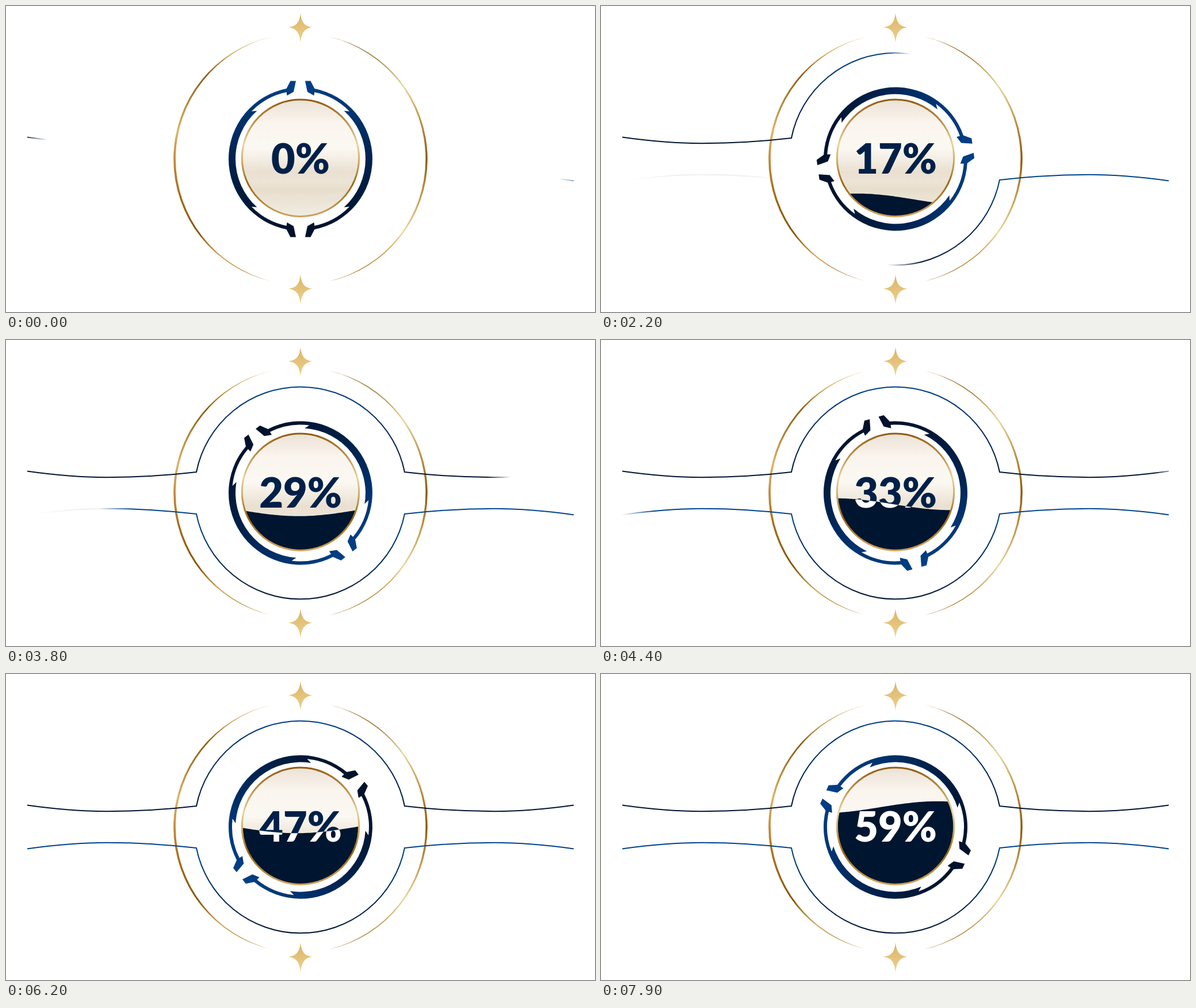
Recreate the animation shown at these times as an HTML page. Size 1024 px wide and 533 px high, loop 8000 ms.

```html
<!DOCTYPE html>
<html lang="en">
<head>
<meta charset="utf-8">
<title>Loading gauge</title>
<style>
  html, body { margin: 0; width: 100%; height: 100%; overflow: hidden; background: #fff; }
  svg { display: block; width: 100%; height: 100%; }
  text { font: 900 72px Lato, "Open Sans", sans-serif; text-anchor: middle; }
</style>
</head>
<body>
<svg viewBox="0 0 1024 533">
  <defs>
    <linearGradient id="star" x2="0" y2="1">
      <stop stop-color="#dcb366"/><stop offset="1" stop-color="#ecd28f"/>
    </linearGradient>
    <linearGradient id="goldLeft" x2="0" y2="1">
      <stop stop-color="#d6b572"/><stop offset=".07" stop-color="#cba557"/>
      <stop offset=".16" stop-color="#8a5a0a"/><stop offset=".38" stop-color="#dcb86a"/>
      <stop offset=".5" stop-color="#c58a3a"/><stop offset=".8" stop-color="#855400"/>
      <stop offset=".9" stop-color="#d3a85c"/><stop offset="1" stop-color="#a27228"/>
    </linearGradient>
    <linearGradient id="goldRight" x2="0" y2="1">
      <stop stop-color="#a27228"/><stop offset=".04" stop-color="#8a5a10"/>
      <stop offset=".2" stop-color="#e8d9a0"/><stop offset=".34" stop-color="#c0954a"/>
      <stop offset=".5" stop-color="#8b5a0a"/><stop offset=".64" stop-color="#c0954a"/>
      <stop offset=".8" stop-color="#ecd9a0"/><stop offset=".92" stop-color="#bb8d40"/>
      <stop offset="1" stop-color="#8b5c10"/>
    </linearGradient>
    <linearGradient id="rim" x2="0" y2="1">
      <stop stop-color="#925c12"/><stop offset=".18" stop-color="#b98d45"/>
      <stop offset=".38" stop-color="#e6d5a0"/><stop offset=".52" stop-color="#d0ad62"/>
      <stop offset=".72" stop-color="#9a6514"/><stop offset="1" stop-color="#cfa25a"/>
    </linearGradient>
    <linearGradient id="cream" x2="0" y2="1">
      <stop stop-color="#ece2d6"/><stop offset=".2" stop-color="#faf5ee"/>
      <stop offset=".42" stop-color="#fbf8f2"/><stop offset=".62" stop-color="#e9e0d0"/>
      <stop offset=".7" stop-color="#ece4d6"/><stop offset=".77" stop-color="#e7decc"/>
      <stop offset="1" stop-color="#f1ece4"/>
    </linearGradient>
    <linearGradient id="navy" gradientUnits="userSpaceOnUse" x1="0" x2="0" y1="130" y2="403">
      <stop stop-color="#004088"/><stop offset=".5" stop-color="#002350"/><stop offset="1" stop-color="#001028"/>
    </linearGradient>
    <linearGradient id="upperInk" x2="0" y2="1">
      <stop stop-color="#003f87"/><stop offset="1" stop-color="#001430"/>
    </linearGradient>
    <linearGradient id="lowerInk" x2="0" y2="1">
      <stop stop-color="#00458f"/><stop offset="1" stop-color="#001430"/>
    </linearGradient>
    <linearGradient id="ghostInk" gradientUnits="userSpaceOnUse" x1="45" x2="331" y1="0" y2="0">
      <stop stop-color="#334" stop-opacity="0"/><stop offset=".3" stop-color="#334" stop-opacity=".08"/>
      <stop offset=".7" stop-color="#334" stop-opacity=".08"/><stop offset="1" stop-color="#334" stop-opacity="0"/>
    </linearGradient>
    <linearGradient id="upperFade" gradientUnits="userSpaceOnUse" y1="0" y2="0">
      <stop stop-color="#fff"/><stop offset="1" stop-color="#fff" stop-opacity="0"/>
    </linearGradient>
    <linearGradient id="lowerFade" gradientUnits="userSpaceOnUse" y1="0" y2="0">
      <stop stop-color="#fff"/><stop offset="1" stop-color="#fff" stop-opacity="0"/>
    </linearGradient>
    <mask id="upperMask" maskUnits="userSpaceOnUse" x="0" y="0" width="1024" height="533">
      <rect width="1024" height="533" fill="url(#upperFade)"/>
    </mask>
    <mask id="lowerMask" maskUnits="userSpaceOnUse" x="0" y="0" width="1024" height="533">
      <rect width="1024" height="533" fill="url(#lowerFade)"/>
    </mask>
    <clipPath id="disc"><circle cx="512" cy="264.8" r="100.7"/></clipPath>
    <clipPath id="waterClip"><path id="waterEdge"/></clipPath>
    <path id="sparkle" fill="url(#star)"
      d="M512 12.5C514 29 519 35.5 533 37C519 39 514 46 512 64C510 46 505 39 491 37C505 35.5 510 29 512 12.5Z"/>
    <g id="half"><path id="band"/><path d="M520 130.5H529.5L537 145L535.5 156L524 149.5Z"/>
      <path d="M520 402.5H529.5L537 388L535.5 377L524 383.5Z"/></g>
  </defs>

  <use href="#sparkle"/>
  <use href="#sparkle" y="455.5"/>
  <path fill="url(#goldLeft)" d="M462 53.5A218.2 218.2 0 0 0 462 479.5A219.3 219.3 0 0 1 462 53.5Z"/>
  <path fill="url(#goldRight)" d="M562 53.5A218.2 218.2 0 0 1 562 479.5A219.2 219.2 0 0 0 562 53.5Z"/>

  <g fill="none" stroke-width="2">
    <path id="ghost" stroke="url(#ghostInk)" d="M37 304.5C83 298 129 293.8 175 293.8C228 293.8 280 297 331 303"/>
    <g mask="url(#upperMask)"><path stroke="url(#upperInk)"
      d="M37 228.5C83 235 129 239.2 175 239.2C228 239.2 280 236 331 230A184.6 184.6 0 0 1 693 230C744 236 796 239.2 849 239.2C895 239.2 941 235 987 228.5"/></g>
    <g mask="url(#lowerMask)"><path stroke="url(#lowerInk)"
      d="M37 304.5C83 298 129 293.8 175 293.8C228 293.8 280 297 331 303A184.6 184.6 0 0 0 693 303C744 297 796 293.8 849 293.8C895 293.8 941 298 987 304.5"/></g>
  </g>

  <g id="ring" fill="url(#navy)">
    <use href="#half"/>
    <use href="#half" transform="matrix(-1 0 0 1 1024 0)"/>
  </g>

  <circle cx="512" cy="264.8" r="101.5" fill="url(#cream)"/>
  <text class="count" x="512" y="291.5" fill="#002048">0%</text>
  <g clip-path="url(#disc)">
    <path id="water" fill="#00152f"/>
    <g clip-path="url(#waterClip)"><text class="count" x="512" y="291.5" fill="#fff">0%</text></g>
  </g>
  <circle cx="512" cy="264.8" r="101.7" fill="none" stroke="url(#rim)" stroke-width="3"/>
</svg>
<script>
const byId = id => document.getElementById(id);
const counts = document.querySelectorAll('.count');
const LOOP = 8000, STEP = 100;

// Water level as [seconds, y]
const levels = [[0, 380], [1.2, 352], [2.2, 337], [3.2, 307], [4.4, 286], [6.2, 267], [7.9, 232]];

// Point on the ring, angle clockwise from the top
function polar(r, degrees) {
  const a = degrees * Math.PI / 180;
  return `${512 + r * Math.sin(a)} ${266.5 - r * Math.cos(a)}`;
}
const arc = (r, degrees, sweep) => `A${r} ${r} 0 0 ${sweep} ${polar(r, degrees)}`;

byId('band').setAttribute('d',
  `M${polar(125, 11)}${arc(125, 169, 1)}L${polar(119, 169)}${arc(119, 134.3, 0)}` +
  `L${polar(113, 138)}${arc(113, 42, 0)}L${polar(119, 45.7)}${arc(119, 11, 0)}Z`);

function levelAt(t) {
  const i = Math.max(1, levels.findIndex(([time]) => time >= t));
  const [t0, y0] = levels[i - 1], [t1, y1] = levels[i];
  return y0 + (y1 - y0) * (t - t0) / (t1 - t0);
}

function waterPath(t) {
  const level = levelAt(t), crest = 445 + 165 * (t - 2.2);
  let d = 'M400 400';
  for (let x = 400; x <= 624; x += 4)
    d += `L${x} ${level - 10.3 * Math.cos((x - crest) * Math.PI / 200)}`;
  return d + 'L624 400Z';
}

function setFade(id, solid, clear) {
  byId(id).setAttribute('x1', solid);
  byId(id).setAttribute('x2', clear);
}

function draw(now) {
  const t = Math.floor(now % LOOP / STEP) * STEP / 1000;
  byId('ring').setAttribute('transform', `rotate(${37.3 * t} 512 266.5)`);
  setFade('upperFade', 30 + 212 * t, 72 + 212 * t);
  setFade('lowerFade', 1018 - 210 * t, 960 - 210 * t);
  byId('ghost').setAttribute('opacity', Math.min(1, t / 0.9));
  const d = waterPath(t);
  byId('water').setAttribute('d', d);
  byId('waterEdge').setAttribute('d', d);
  const label = Math.round(7.5 * t) + '%';
  counts.forEach(el => { el.textContent = label; });
  requestAnimationFrame(draw);
}
draw(performance.now());
</script>
</body>
</html>
```
